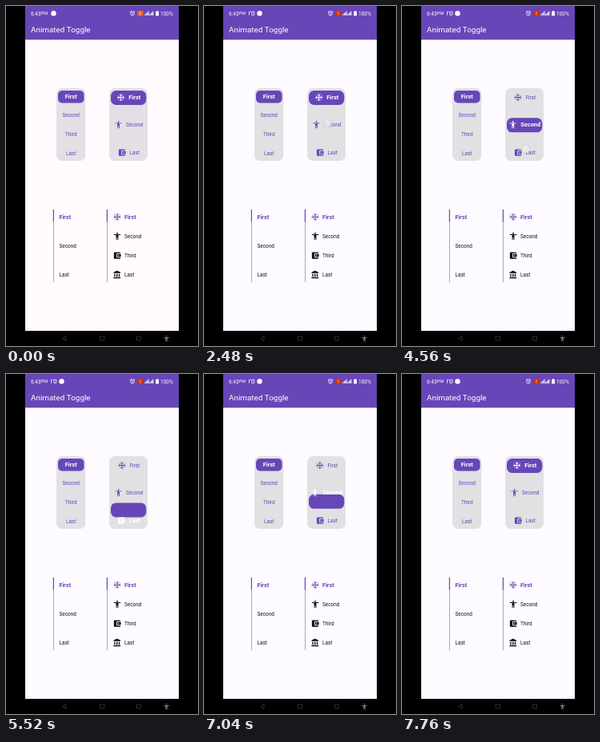
These frames come from a looping animation (240x426 px, 8000 ms). An HTML page with a canvas:

```html
<!DOCTYPE html>
<html lang="en">
<head>
<meta charset="utf-8">
<title>Animated Toggle</title>
<style>
html, body { margin: 0; width: 100%; height: 100%; overflow: hidden; background: #000; }
canvas { display: block; width: 240px; height: 426px; }
</style>
</head>
<body>
<canvas id="stage"></canvas>
<script>
const W = 240, H = 426, LOOP = 8000;
const PURPLE = '#6746b8', WHITE = '#fff', INK = '#151318';
const canvas = document.getElementById('stage');
const ctx = canvas.getContext('2d');
const dpr = Math.max(1, window.devicePixelRatio || 1);
canvas.width = W * dpr;
canvas.height = H * dpr;

const clamp = v => Math.max(0, Math.min(1, v));
const ease = p => 0.5 - 0.5 * Math.cos(Math.PI * clamp(p));
const mix = (a, b, p) => a + (b - a) * p;
const blend = (a, b, p) => `rgb(${a.map((v, i) => Math.round(mix(v, b[i], p))).join(',')})`;

function rect(x, y, w, h, color, r = 0) {
  ctx.fillStyle = color;
  ctx.beginPath();
  ctx.roundRect(x, y, w, h, r);
  ctx.fill();
}

function disc(x, y, r, color) {
  ctx.fillStyle = color;
  ctx.beginPath();
  ctx.arc(x, y, r, 0, 7);
  ctx.fill();
}

function font(size, weight) {
  ctx.font = `${weight} ${size}px Roboto, sans-serif`;
}

// y is the middle of the capitals
function label(str, x, y, color, size = 6.4, weight = 400, align = 'left') {
  font(size, weight);
  ctx.textAlign = align;
  ctx.fillStyle = color;
  ctx.fillText(str, x, y + size * 0.355);
}

// Icons use a 24-unit box
const shapes = {
  person: new Path2D('M21 9h-6v13h-2v-6h-2v6H9V9H3V7h18zM14 4a2 2 0 1 1-4 0a2 2 0 1 1 4 0z'),
  wallet: new Path2D('M21 18v1a2 2 0 0 1-2 2H5a2 2 0 0 1-2-2V5a2 2 0 0 1 2-2h14a2 2 0 0 1 2 2v1h-9a2 2 0 0 0-2 2v8a2 2 0 0 0 2 2zM12 16h10V8H12zM17.5 12a1.5 1.5 0 1 1-3 0a1.5 1.5 0 1 1 3 0z'),
  bank: new Path2D('M4 10v7h3v-7zM10 10v7h3v-7zM2 22h19v-3H2zM16 10v7h3v-7zM11.5 1L2 6v2h19V6z')
};
const snowArm = new Path2D('M0 0V-10M-4.5 -8.3L0 -3.8L4.5 -8.3');

function icon(name, x, y, color, size = 11) {
  ctx.save();
  ctx.translate(x, y);
  ctx.scale(size / 24, size / 24);
  if (name === 'snow') {
    ctx.strokeStyle = color;
    ctx.lineWidth = 2;
    for (let i = 0; i < 4; i++) {
      ctx.stroke(snowArm);
      ctx.rotate(Math.PI / 2);
    }
  } else {
    ctx.translate(-12, -12);
    ctx.fillStyle = color;
    ctx.fill(shapes[name], 'evenodd');
  }
  ctx.restore();
}

const rows = [
  { text: 'First', icon: 'snow', y: 114.5 },
  { text: 'Second', icon: 'person', y: 148.7 },
  { text: 'Last', icon: 'wallet', y: 183.6 }
];
const stops = [115, 149.3, 183.7];
const moves = [
  { at: 2980, time: 600, from: 0, to: 1 },
  { at: 5177, time: 600, from: 1, to: 2 },
  { at: 6608, time: 1080, from: 2, to: 0 }
];
const touches = [
  { x: 154.3, y: 147.6, on: 2480, off: 2960 },
  { x: 159, y: 173, on: 3760, off: 4120 },
  { x: 155, y: 179, on: 4560, off: 5120 },
  { x: 156, y: 113, on: 6400, off: 6600 }
];

function pillState(t) {
  let state = { y: stops[0], dir: 0 };
  for (const m of moves) {
    if (t < m.at) break;
    const p = (t - m.at) / m.time;
    state = {
      y: mix(stops[m.from], stops[m.to], ease(p)),
      dir: p < 1 ? Math.sign(m.to - m.from) : 0
    };
  }
  return state;
}

function statusBar(t) {
  const p = ease((t - 80) / 320);
  label('6:43', 31, 9.2, WHITE, 6.5);
  label('PM', 43.6, 9.2, WHITE, 5.6);
  if (p > 0) {
    ctx.globalAlpha = p;
    ctx.strokeStyle = WHITE;
    ctx.lineWidth = 0.8;
    ctx.beginPath();
    ctx.moveTo(56.5, 11.5);
    ctx.lineTo(56.5, 7.2);
    ctx.lineTo(58.5, 7.2);
    ctx.rect(59.8, 7.2, 3, 4);
    ctx.stroke();
    ctx.globalAlpha = 1;
  }
  disc(mix(59.5, 69.5, p), 9.2, 3.2, WHITE);

  ctx.strokeStyle = WHITE;
  ctx.lineWidth = 0.8;
  ctx.beginPath();
  ctx.arc(158, 9.3, 2.4, 0, 7);
  ctx.moveTo(158, 7.8);
  ctx.lineTo(158, 9.5);
  ctx.lineTo(159.2, 10);
  ctx.moveTo(155, 7.4);
  ctx.lineTo(156.5, 6.1);
  ctx.moveTo(161, 7.4);
  ctx.lineTo(159.5, 6.1);
  ctx.stroke();
  rect(164, 6, 8, 6.5, blend([242, 84, 40], [205, 50, 25], p), 1);
  rect(167.2, 7.3, 1.4, 4, blend([255, 205, 130], [245, 140, 50], p));
  for (let i = 0; i < 8; i++) {
    const h = 1.6 + (i % 4) * 1.2;
    rect(173.3 + i * 1.45, 11.8 - h, 1, h, WHITE);
  }
  rect(187.2, 6.8, 3.8, 5.4, WHITE, 0.5);
  rect(188.3, 6, 1.6, 1, WHITE);
  label('100%', 193, 9.2, WHITE, 6.5);
}

function navBar() {
  rect(24, 407, 192, 19, '#000');
  ctx.strokeStyle = '#3c3c3c';
  ctx.lineWidth = 0.8;
  ctx.beginPath();
  ctx.moveTo(75, 413.5);
  ctx.lineTo(70.5, 416.5);
  ctx.lineTo(75, 419.5);
  ctx.closePath();
  ctx.rect(117.3, 414, 5.4, 5);
  ctx.rect(163.5, 414, 5, 5);
  ctx.stroke();
  icon('person', 200.5, 416.8, '#8a8a8a', 9);
}

function textToggle(panel) {
  rect(63, 103, 36.3, 91, panel, 7);
  rect(65, 106, 32.6, 15.4, PURPLE, 5);
  label('First', 81.2, 113.6, WHITE, 7.4, 700, 'center');
  ['Second', 'Third', 'Last'].forEach((s, i) =>
    label(s, 81.2, 137 + i * 23.9, PURPLE, 6.4, 400, 'center'));
}

function iconToggle(t, panel) {
  const pill = pillState(t);
  rect(129, 103, 48, 91, panel, 7);
  rect(131, pill.y - 9, 44.3, 18, PURPLE, 6.5);
  rows.forEach((row, i) => {
    const gap = stops[i] - pill.y, dist = Math.abs(gap);
    const ahead = gap * pill.dir >= 0;
    const k = clamp(ahead ? (20.5 - dist) / 5 : (12 - dist) / 6);
    const size = mix(6.4, 7.4, k), weight = k > 0.5 ? 700 : 400;
    font(size, weight);
    const left = 153.2 - (15 + ctx.measureText(row.text).width) / 2;
    const tone = blend([103, 70, 184], [255, 255, 255], k);
    const iconTone = blend([103, 70, 184], [255, 255, 255], clamp(k * 1.4));
    icon(row.icon, left + 5.5, row.y, iconTone);
    label(row.text, left + 15, row.y, tone, size, weight);
  });
}

function rail(x) {
  rect(x, 255, 0.9, 91, '#a5a2a8');
  rect(x - 0.2, 255, 1.2, 15.5, PURPLE);
}

function lists() {
  rail(59);
  label('First', 66.5, 264.3, PURPLE, 7.2, 700);
  label('Second', 66.5, 300.4, INK);
  label('Last', 66.5, 336.6, INK);

  rail(126);
  ['First', 'Second', 'Third', 'Last'].forEach((s, i) => {
    const y = 264.3 + i * 24.1, on = i === 0;
    icon(['snow', 'person', 'wallet', 'bank'][i], 139, y, on ? PURPLE : '#0b0a0d');
    label(s, 148, y, on ? PURPLE : INK, on ? 7.2 : 6.4, on ? 700 : 400);
  });
}

function touchDots(t) {
  for (const d of touches) {
    if (t < d.on || t >= d.off) continue;
    disc(d.x, d.y, 5.2, 'rgba(140,135,150,.35)');
    disc(d.x, d.y, 4.7, 'rgba(250,249,252,.72)');
  }
}

function draw(t) {
  const settle = clamp((t - 80) / 80);
  const panel = blend([227, 223, 229], [225, 224, 227], settle);
  ctx.setTransform(dpr, 0, 0, dpr, 0, 0);
  rect(0, 0, W, H, '#000');
  rect(24, 0, 192, 407, blend([255, 250, 253], [253, 251, 255], settle));
  rect(24, 0, 192, 42.3, PURPLE);
  statusBar(t);
  label('Animated Toggle', 31, 29.8, WHITE, 9.9);
  textToggle(panel);
  iconToggle(t, panel);
  lists();
  touchDots(t);
  navBar();
}

const start = performance.now();
function frame() {
  draw((performance.now() - start) % LOOP);
  requestAnimationFrame(frame);
}
frame();
</script>
</body>
</html>
```
